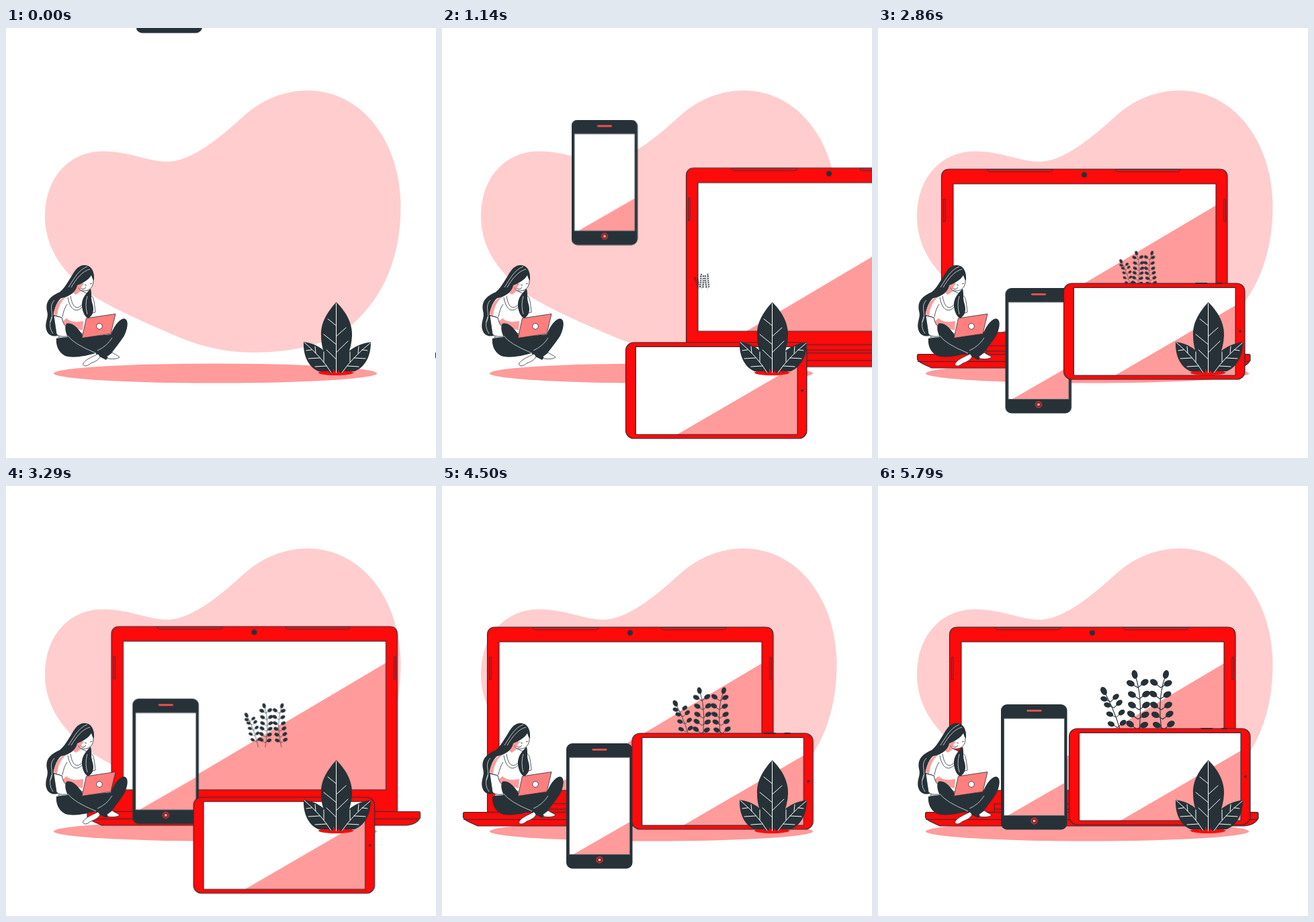
Write an HTML page without scripts that moves like this. It is 640 by 640 pixels and loops after 7500 ms.

```html
<!DOCTYPE html>
<html lang="en">
<head>
<meta charset="utf-8">
<title>Devices</title>
<style>
html, body { margin: 0; width: 100%; height: 100%; overflow: hidden; background: #fff; }
svg { display: block; width: 100vw; height: 100vh; }

.dark { fill: #263238; }
.red { fill: #ff0a0a; }
.pink { fill: #ff9b9b; }
.white { fill: #fff; }
.edge { stroke: #263238; stroke-width: 1.2; }
.thin { stroke: #263238; stroke-width: .8; }
.line { fill: none; stroke: #263238; stroke-width: 1.1; }
.vein { fill: none; stroke: #fff; stroke-width: 1; stroke-linecap: round; }
.hairline { fill: none; stroke: #fff; stroke-width: .7; }

/* 105 ticks per loop; every leg moves at an even pace, tick by tick */
.laptop, .phone, .tablet, .sprigs { animation: 7500ms -4ms infinite; }
.laptop { animation-name: laptop; }
.phone { animation-name: phone; }
.tablet { animation-name: tablet; }
.sprigs { animation-name: grow; transform-origin: 387px 389px; }

@keyframes laptop {
  0% { transform: translate(569px, -3px); animation-timing-function: steps(16); }
  15.238% { transform: translate(257px, -1.7px); animation-timing-function: steps(11); }
  25.714% { transform: translate(41px, 0); animation-timing-function: steps(6); }
  31.429% { transform: translate(-64px, 0); animation-timing-function: steps(1); }
  32.381% { transform: translate(-76px, 0); animation-timing-function: steps(6); }
  38.095% { transform: translate(-12px, 0); animation-timing-function: steps(4); }
  41.905% { transform: translate(31px, -.5px); animation-timing-function: steps(4); }
  45.714% { transform: translate(70px, -1.3px); animation-timing-function: steps(1); }
  46.667% { transform: translate(72px, -1.3px); animation-timing-function: steps(4); }
  50.476% { transform: translate(27px, -1px); animation-timing-function: steps(2); }
  52.381% { transform: translate(3px, -.7px); animation-timing-function: steps(5); }
  57.143% { transform: translate(-55px, 0); animation-timing-function: steps(3); }
  60% { transform: translate(-39px, 0); animation-timing-function: steps(3); }
  62.857% { transform: translate(-23px, 0); animation-timing-function: steps(6); }
  68.571% { transform: translate(14px, 0); animation-timing-function: steps(9); }
  77.143%, 100% { transform: none; }
}
@keyframes phone {
  0% { transform: translate(10.5px, -504px); animation-timing-function: steps(16); }
  15.238% { transform: translate(9.5px, -188.5px); animation-timing-function: steps(11); }
  25.714% { transform: translate(8.7px, 28px); animation-timing-function: steps(6); }
  31.429% { transform: translate(7.6px, 137px); animation-timing-function: steps(7); }
  38.095% { transform: translate(6.5px, 62px); animation-timing-function: steps(8); }
  45.714% { transform: translate(5px, -32px); animation-timing-function: steps(5); }
  50.476% { transform: translate(4.2px, 5.5px); animation-timing-function: steps(7); }
  57.143% { transform: translate(2.7px, 70px); animation-timing-function: steps(3); }
  60% { transform: translate(2px, 58px); animation-timing-function: steps(9); }
  68.571% { transform: translate(1px, 25px); animation-timing-function: steps(9); }
  77.143%, 100% { transform: none; }
}
@keyframes tablet {
  0% { transform: translate(-12px, 285px); animation-timing-function: steps(16); }
  15.238% { transform: translate(-11px, 107px); animation-timing-function: steps(11); }
  25.714% { transform: translate(-10.8px, -16px); animation-timing-function: steps(6); }
  31.429% { transform: translate(-10px, -80px); animation-timing-function: steps(7); }
  38.095% { transform: translate(-8px, 19px); animation-timing-function: steps(8); }
  45.714% { transform: translate(-4.5px, 130px); animation-timing-function: steps(5); }
  50.476% { transform: translate(-2.5px, 72px); animation-timing-function: steps(7); }
  57.143% { transform: translate(-2px, -12px); animation-timing-function: steps(3); }
  60% { transform: translate(-1.7px, 7px); animation-timing-function: steps(9); }
  68.571% { transform: translate(-.8px, 62px); animation-timing-function: steps(5); }
  73.333% { transform: translate(-.4px, 21px); animation-timing-function: steps(4); }
  77.143%, 100% { transform: none; }
}
@keyframes grow {
  0% { transform: scale(.008); animation-timing-function: steps(81); }
  77.143%, 100% { transform: none; }
}
</style>
</head>
<body>
<svg viewBox="0 0 640 640">
  <defs>
    <g id="pair" class="dark">
      <ellipse cx="-10.500" cy="-2" rx="6.300" ry="4.400" transform="rotate(28 -10.500 -2)"/>
      <ellipse cx="10.500" cy="-2" rx="6.300" ry="4.400" transform="rotate(-28 10.500 -2)"/>
      <path class="line" d="M-6 1L0 5L6 1"/>
    </g>
    <ellipse id="tip" class="dark" rx="4.400" ry="6.500"/>
  </defs>

  <path fill="#ffcdcd" d="M58 280C58 222 95 183 145 183.500C185 184 212 199 240 199C275 199 318 164 355 130C382 106 415 93 449 93C530 93 587.500 170 587.500 266C587.500 340 562 398 520 437C492 466 440 482.500 368 483C328 483 290 474 258 460.500C215 442 170 423 130 399C100 375 58 340 58 280Z"/>
  <ellipse class="pink" cx="311.500" cy="514" rx="240.500" ry="14.500"/>

  <g class="laptop">
    <path class="red edge" d="M106.500 486V222Q106.500 210 118.500 210H520Q532 210 532 222V486Z"/>
    <path class="white" d="M124 232H515V453H124Z"/>
    <path class="pink" d="M515 264V453H196Z"/>
    <path class="line" d="M124 232H515V453H124Z"/>
    <g fill="#e8141a" class="thin">
      <path d="M174 210.500H272Q271 214 268 214H178Q175 214 174 210.500Z"/>
      <path d="M365 210.500H462Q461 214 458 214H369Q366 214 365 210.500Z"/>
      <rect x="109.500" y="255" width="2.500" height="33"/>
      <rect x="527" y="255" width="2.500" height="33"/>
    </g>
    <circle class="dark" cx="319" cy="218.500" r="4"/>
    <path class="line" d="M173 473H465M173 481H465M173 473V486M465 473V486"/>
    <path class="red edge" d="M72 485.500H564Q566 485.500 566 487.500V495Q560 505 546 506H92L79 500Q71 496 70.500 493V487.500Q70.500 485.500 72 485.500Z"/>
    <path class="line" d="M71 496.500H565"/>
  </g>

  <g class="sprigs">
    <path class="line" d="M367 389Q358 345 337 306M385 389Q397 325 383 282M427 389Q412 325 428 282"/>
    <use href="#tip" transform="translate(336 305) rotate(-28)"/>
    <use href="#tip" transform="translate(382 280.500) rotate(-14)"/>
    <use href="#tip" transform="translate(428.500 280.500) rotate(16)"/>
    <use href="#pair" transform="translate(345.500 317) rotate(-10) scale(.85)"/>
    <use href="#pair" transform="translate(350.500 326) rotate(-10) scale(.85)"/>
    <use href="#pair" transform="translate(354 340) rotate(-8) scale(.85)"/>
    <use href="#pair" transform="translate(356 355) rotate(-6) scale(.85)"/>
    <use href="#pair" transform="translate(361 370) rotate(-5) scale(.85)"/>
    <use href="#pair" transform="translate(386.500 295) rotate(-4)"/>
    <use href="#pair" transform="translate(388.500 312) rotate(-2)"/>
    <use href="#pair" transform="translate(388.500 328)"/>
    <use href="#pair" transform="translate(387 342) rotate(3)"/>
    <use href="#pair" transform="translate(385.500 357) rotate(4)"/>
    <use href="#pair" transform="translate(384.500 372) rotate(5)"/>
    <use href="#pair" transform="translate(421 295) rotate(4)"/>
    <use href="#pair" transform="translate(420 312) rotate(2)"/>
    <use href="#pair" transform="translate(421.500 328)"/>
    <use href="#pair" transform="translate(423.500 342) rotate(-3)"/>
    <use href="#pair" transform="translate(425.500 357) rotate(-4)"/>
    <use href="#pair" transform="translate(427 372) rotate(-5)"/>
  </g>

  <g class="phone">
    <rect class="dark" x="183" y="325" width="98.500" height="186.500" rx="9"/>
    <path class="white" d="M187.500 346H277.500V490.500H187.500Z"/>
    <path class="pink" d="M277.500 442V490.500H193Z"/>
    <path fill="none" stroke="#59656a" d="M187.500 346H277.500V490.500H187.500Z"/>
    <rect x="221.500" y="333" width="22" height="2.800" rx="1.400" fill="#ff5252"/>
    <circle cx="232.500" cy="498.500" r="4.300" fill="#5a1c22" stroke="#f33" stroke-width="1.300"/>
    <rect x="230.700" y="496.700" width="3.600" height="3.600" fill="#ffb0b0"/>
  </g>

  <g class="tablet">
    <rect class="red edge" x="284.500" y="361" width="269.500" height="143" rx="12"/>
    <path class="white" d="M299.500 367.500H540V498H299.500Z"/>
    <path class="pink" d="M540 394V498H361Z"/>
    <path class="line" d="M299.500 367.500H540V498H299.500Z"/>
    <path class="line" style="stroke-width:2" d="M480.500 361H498M511.500 361H520"/>
    <circle class="dark" cx="547" cy="432.500" r="1.700"/>
  </g>

  <g class="girl" stroke-linejoin="round">
    <path class="dark" d="M104 362C94 372 90 385 80 393C66 399 58 407 61 421C64 431 58 436 59.500 447C62 459 72 461 81 456L86 420L102 398L112 386Z"/>
    <path class="white thin" d="M88 398C96 394 104 390 112 391L124 397C130 399 131 402 133 423L125 425L122 440L116 461H78C86 446 85 440 83 431L70 427C73 412 78 402 88 398Z"/>
    <path class="pink" d="M71 426C73 411 80 402 91 399C82 406 78 414 76 428ZM79 443Q84 436 90 432Q98 440 115 436L114 450L94 444Z"/>
    <path class="line" style="stroke-width:.8" d="M92 401C96 424 108 424 116 412M96 399C99 417 106 420 114 411M91 411Q86 418 84 430"/>
    <path class="white thin" d="M71 428L75 455Q77 460 90 459L114 461L116 456L91 444Q86 445 83 431Z"/>
    <path class="dark" d="M90 440C100 437 108 448 116 460L156 456C160 446 167 434 175 432.500C184 433 181 448 176 458C168 470 160 480 149 494L137 488L133 484C120 488 100 492 88 488C77 482 74 471 75 462L92 460C88 452 87 444 90 440Z"/>
    <path class="hairline" d="M92 458Q100 470 134 484M136 480Q150 474 158 461"/>
    <path class="pink" d="M107 376L112 391L104 397L100 394Z"/>
    <path class="white thin" d="M107 374C106 386 109 391 114 391C122 392 129 388 130 378V366L113 364Z"/>
    <path class="pink" d="M106 382Q112 378 116 381Q112 384 111 389Q107 387 106 382Z"/>
    <path class="dark" d="M131 376C132 360 126 353 116 353C104 354 100 366 93 378C88 391 78 395 75 403C92 402 104 394 106 383C114 380 123 375 127 368Q128 373 131 376Z"/>
    <path class="dark" d="M126 388C120 394 112 402 113 414C114 424 118 430 122 432C130 428 132 420 128 408C126 400 128 396 126 388Z"/>
    <path class="line" style="stroke-width:.8" d="M117 382L120 383M125 381L128 380M111 387Q115 391 119 386"/>
    <path class="hairline" d="M125 359C113 362 104 374 97 386M121 355C108 360 102 372 93 386M72 405C62 416 73 425 66 438M68 430Q62 444 70 455M121 399Q117 412 121 426"/>
    <path fill="#ff7f7f" class="thin" d="M119.500 432L163 425.500L156 455L113 461.500Z"/>
    <circle class="white thin" cx="139" cy="444" r="4.300"/>
    <path class="white thin" d="M137 485C128 490 118 493 114.500 500C115 505 122 503 126 499C132 497 138 494 140 489ZM150 489L158 483C162 486 166 487 169 490C165 493 157 493 152 492Z"/>
  </g>

  <g class="plant">
    <ellipse class="red" cx="491" cy="513" rx="26" ry="4"/>
    <path class="dark" d="M491.500 408C504 420 516 438 515 458C514 481 504 500 493 514.500C480 500 469 482 469 458C468 438 479 422 491.500 408Z"/>
    <path class="dark" d="M443 467C462 470 485 480 488 513L483 514L476 511H465C450 504 442 488 443 467Z"/>
    <path class="dark" d="M543 467.500C524 470 499 480 495 513L500 514L508 511H519C535 504 543 488 543 467.500Z"/>
    <path class="red" d="M466 513L474 514L479 510L484 515L488 510L491 515L495 510L499 515L504 510L508 514L516 513L491 517Z"/>
    <path class="vein" d="M491.500 410V513M491.500 443L479 433M491.500 459L506 446M491.500 471L473 456M491.500 483L509 466M491.500 493L477 479"/>
    <path class="vein" d="M444 468Q470 490 484 513M455 479L447 480M461 484L460 474M467 491L450 492M473 497L473 482M477 503L460 504"/>
    <path class="vein" d="M542 469Q516 490 500 513M530 479L538 480M524 484L525 474M518 491L535 492M512 497L512 482M508 503L525 504"/>
  </g>
</svg>
</body>
</html>
```
